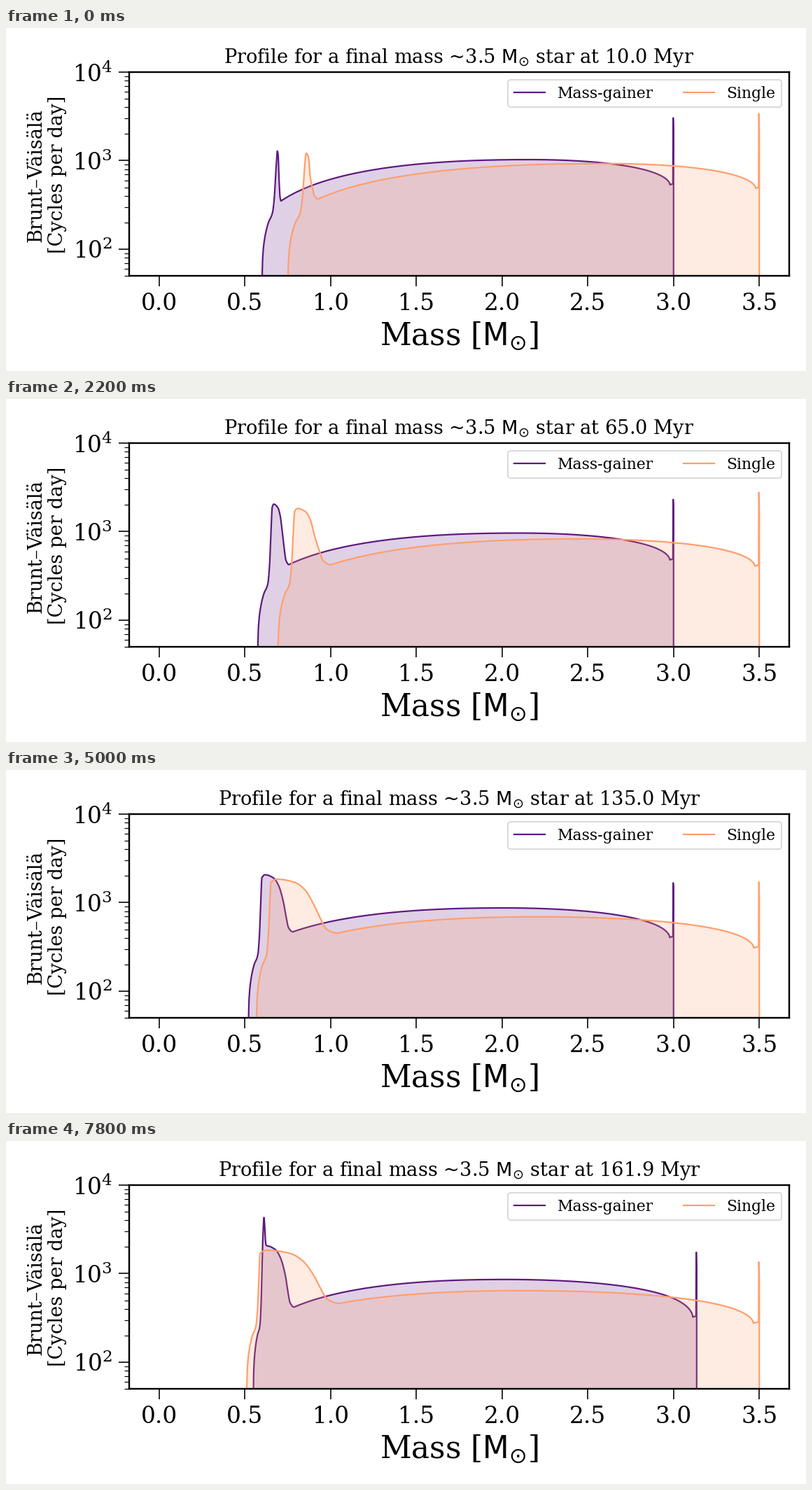
Animation of 1143x490 px, one loop 8 s. Source, as a matplotlib script:

```python
import numpy as np
import matplotlib.pyplot as plt
from matplotlib.animation import FuncAnimation
from matplotlib.ticker import NullFormatter

W, H, DPI = 1143, 490, 72          # at 72 dpi one point is one pixel
LEFT, RIGHT, TOP, BOTTOM = 176, 1119, 63, 354
XLIM, YLIM = (-0.175, 3.675), (50, 1e4)
DECADE = (BOTTOM - TOP) / np.log10(YLIM[1] / YLIM[0])
N_FRAMES, STEP = 40, 200
FIRST_AGE, LAST_AGE, AGE_STEP = 10, 161.8, 5
TRANSFER = 33                      # mass transfer starts at this frame
SUN = r"$\mathrm{M_{\odot}}$"

# Stage pixels at the first and last age.
GAINER = dict(
    foot=(366, 340.5), shoulder=(387.2, 358.8), peak_y=(175.8, 149.7),
    half=(0.46, 0.73), dip_x=(393, 411.5), dip_y=(247, 229.6),
    crest_x=(750, 703), crest_y=(188, 199.3), outer_y=(224, 243), gap=(4.5, 5),
    spike_y=(128.5, 168), spike_step=(19, 5), fade=0.95, surface=953.2)
SINGLE = dict(
    foot=(403, 344), shoulder=(428, 363), peak_y=(178.8, 156),
    half=(0.36, 0.69), dip_x=(446, 476), dip_y=(244.3, 232),
    crest_x=(860, 740), crest_y=(193.7, 213.8), outer_y=(229, 260), gap=(4.5, 8),
    spike_y=(122.5, 173), spike_step=(26, 22), fade=1.5, surface=1075.7)

# Shapes shared by both stars, as fractions (x, y) from one anchor to the next.
KNEE, KNEE_Y = 0.7, 263.5
RAMP = [(0.06, 0.31), (0.25, 0.60), (0.58, 0.83)]
WALL = [(0.37, 0.23), (0.75, 0.72)]
PLATEAU = [(0.15, 0), (0.55, 0.06), (0.77, 0.19), (1, 0.5)]
SLOPE = [(0.2, 0.36), (0.54, 0.86)]


def between(a, b, shape):
    (xa, ya), (xb, yb) = a, b
    return [(xa + u * (xb - xa), ya + v * (yb - ya)) for u, v in shape]


def smooth(points, n=14):
    """Monotone cubic curve through points with rising x, flat at the end."""
    x, y = np.array(points).T
    h = np.diff(x)
    d = np.diff(y) / h
    m = np.zeros_like(x)
    m[0] = d[0]
    for i in range(1, len(x) - 1):
        if d[i - 1] * d[i] > 0:
            w1, w2 = 2 * h[i] + h[i - 1], h[i] + 2 * h[i - 1]
            m[i] = (w1 + w2) / (w1 / d[i - 1] + w2 / d[i])
    t = np.linspace(0, 1, n, endpoint=False)
    h, y0, y1, m0, m1 = (a[:, None] for a in (h, y[:-1], y[1:], m[:-1], m[1:]))
    px = x[:-1, None] + t * h
    py = ((1 + 2 * t) * (1 - t) ** 2 * y0 + t * (1 - t) ** 2 * h * m0
          + t ** 2 * (3 - 2 * t) * y1 + t ** 2 * (t - 1) * h * m1)
    return px.ravel(), py.ravel()


def arc(xs, base_y, crest_y, drop):
    """Blend from crest to base, linear in frequency and so curved in pixels."""
    base = 10 ** ((crest_y - base_y) / DECADE)
    return xs, crest_y - DECADE * np.log10(1 - drop * (1 - base))


def to_data(px, py):
    x = XLIM[0] + (px - LEFT) / (RIGHT - LEFT) * (XLIM[1] - XLIM[0])
    return x, YLIM[1] * 10 ** ((TOP - py) / DECADE)


def profile(star, u, gain):
    """Curve at evolution u (0 to 1) after a share gain of the mass transfer."""
    def at(key, pace):
        a, b = star[key]
        return a + (b - a) * pace

    core, mixed, env, growth = u ** 1.4, u ** 0.5, u ** 1.15, 1 - np.exp(-11 * u)
    foot_x = at("foot", core) + 13 * gain
    edge = at("shoulder", core) + 8 * gain
    peak_y = at("peak_y", growth)
    dip = dip_x, dip_y = at("dip_x", mixed), at("dip_y", mixed) + 7.7 * gain
    crest_x = at("crest_x", env) + 12 * gain
    crest_y = at("crest_y", env) - 1.5 * gain
    surface = star["surface"] + 33 * gain
    outer_x, outer_y = surface - at("gap", u), at("outer_y", env) + 8.5 * gain
    spike_y = at("spike_y", u ** star["fade"]) - 9 * gain
    spike_step = at("spike_step", u) + 21 * gain

    foot = (foot_x, BOTTOM)
    knee = (foot_x + KNEE * (edge - foot_x), KNEE_Y)
    shoulder = (edge, peak_y + 4.5)
    half = (edge + at("half", mixed) * (dip_x - edge), (peak_y + dip_y) / 2)
    plateau = [(edge + a * (half[0] - edge), peak_y + b * (dip_y - peak_y))
               for a, b in PLATEAU]
    px, py = smooth([
        (foot_x - 0.3, BOTTOM + 30), foot, *between(foot, knee, RAMP),
        knee, *between(knee, shoulder, WALL),
        shoulder, *plateau, *between(half, dip, SLOPE), dip])
    py = py - 42 * gain * np.exp(-((px - edge - 1.8) / 1.6) ** 2)

    t = np.linspace(0, 1, 80)
    rise = arc(dip_x + t * (crest_x - dip_x), dip_y, crest_y, (1 - t) ** 2.25)
    r = np.sin(t * np.pi / 2)
    fall = arc(crest_x + r * (outer_x - crest_x), outer_y, crest_y,
               1 - (1 - r ** 2) ** 0.6)
    spike = ([surface - 0.4, surface, surface + 0.6, surface + 0.6],
             [outer_y - 1.5, spike_y, spike_y + spike_step, BOTTOM + 40])
    return to_data(np.concatenate([px, rise[0], fall[0], spike[0]]),
                   np.concatenate([py, rise[1], fall[1], spike[1]]))


plt.rcParams["font.family"] = "DejaVu Serif"
fig = plt.figure(figsize=(W / DPI, H / DPI), dpi=DPI, facecolor="white")
ax = fig.add_axes([LEFT / W, 1 - BOTTOM / H, (RIGHT - LEFT) / W, (BOTTOM - TOP) / H])
ax.set_yscale("log")
ax.set_xlim(XLIM)
ax.set_ylim(YLIM)
ax.set_xticks(np.arange(0, 3.6, 0.5))
ax.yaxis.set_minor_formatter(NullFormatter())
ax.tick_params(which="major", length=14.6, width=1.6, pad=9.1, labelsize=32.8)
ax.tick_params(which="minor", length=7.3, width=1.2)
for spine in ax.spines.values():
    spine.set_linewidth(2.4)

title = ax.set_title("", fontsize=27.3, pad=13)
fig.text((LEFT + RIGHT) / 2 / W, 1 - 453 / H, f"Mass [{SUN}]",
         fontsize=43.8, ha="center", va="baseline")
for x, y, label in [(50.5, 210, "Brunt–Väisälä"), (81, 209, "[Cycles per day]")]:
    fig.text(x / W, 1 - y / H, label, fontsize=27.4, rotation=90,
             rotation_mode="anchor", ha="center", va="baseline")


def add_star(label, color, z, star):
    area, = ax.fill([0, 1, 1], [60, 60, 70], color=color, alpha=0.2, lw=0, zorder=z)
    line, = ax.plot([], [], color=color, lw=2.2, label=label, zorder=z + 0.1)
    return line, area, star


gainer = add_star("Mass-gainer", "#5f187f", 1.0, GAINER)
single = add_star("Single", "#fe9f6d", 1.5, SINGLE)
legend = ax.legend(loc="upper right", ncol=2, fontsize=21.84)
legend.get_frame().set_linewidth(1.8)


def update(n):
    age = min(FIRST_AGE + AGE_STEP * n, LAST_AGE)
    u = (age - FIRST_AGE) / (LAST_AGE - FIRST_AGE)
    gain = max(0, n - TRANSFER) / (N_FRAMES - 1 - TRANSFER)
    title.set_text(f"Profile for a final mass ~3.5 {SUN} star at "
                   f"{age + 0.09 * gain:.1f} Myr")
    for (line, area, star), share in ((gainer, gain), (single, 0)):
        x, y = profile(star, u, share)
        line.set_data(x, y)
        area.set_xy(np.column_stack([x, y]))
    return [title, *gainer[:2], *single[:2]]


anim = FuncAnimation(fig, update, frames=N_FRAMES, interval=STEP,
                     repeat=True, repeat_delay=0, blit=False)
plt.show()
```
